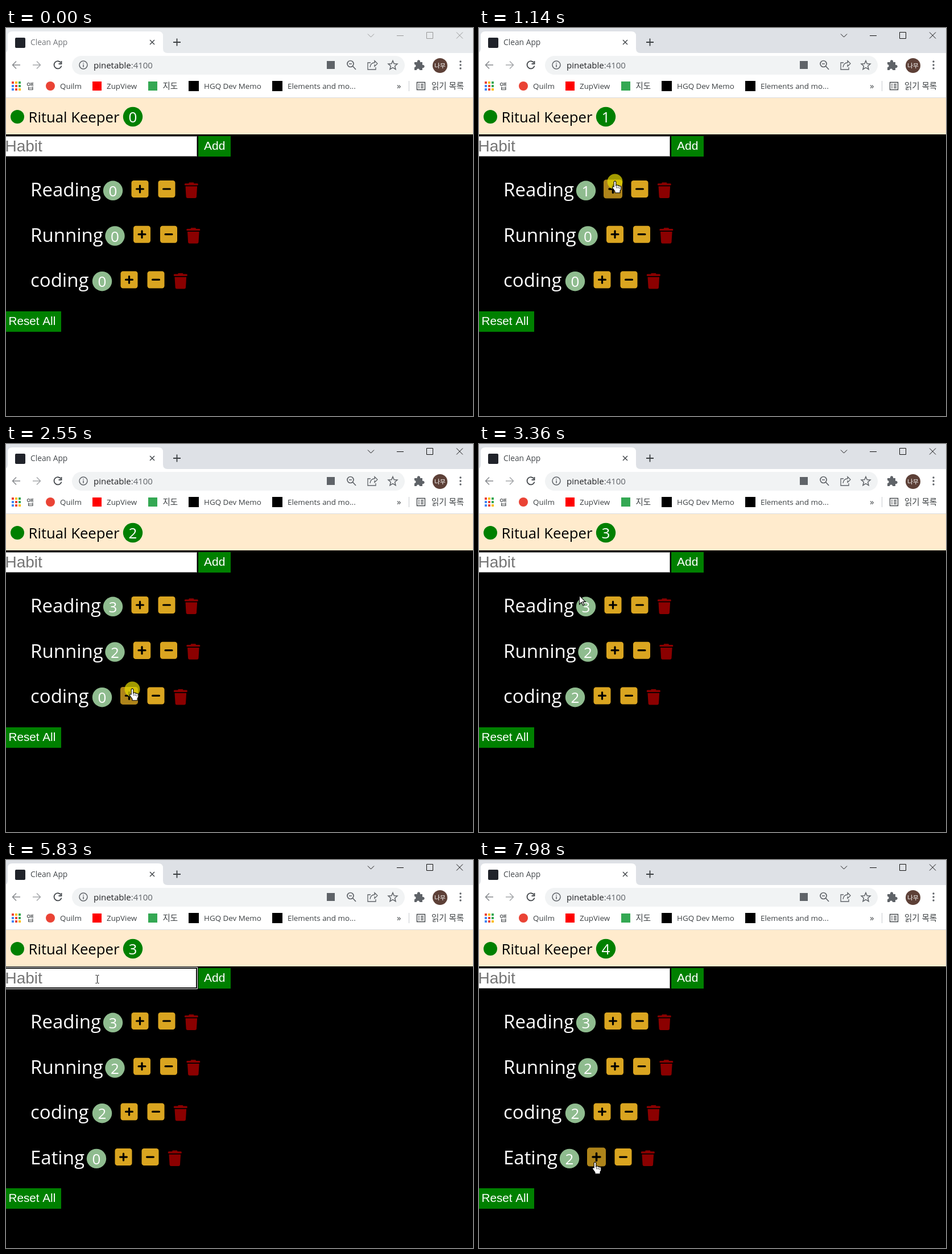
Recreate the animation shown at these times as an HTML page with a canvas. Size 821 px wide and 682 px high, loop 8000 ms.

```html
<!DOCTYPE html>
<html lang="ko">
<head>
<meta charset="utf-8">
<title>Clean App</title>
<style>
html, body { margin: 0; width: 100%; height: 100%; overflow: hidden; background: #000; }
canvas { display: block; width: 821px; height: 682px; }
</style>
</head>
<body>
<canvas id="stage" width="821" height="682"></canvas>
<script>
const ctx = document.getElementById('stage').getContext('2d');
const UI = '"Open Sans","Noto Sans CJK KR","Noto Sans CJK JP",sans-serif';
const ARIAL = '"Liberation Sans",Arial,sans-serif';
const LOOP = 8000, STEP = 200 / 3;
const GREY = '#5f6368';

// count: the times at which a habit's counter goes up; hover: time span of the pointer on its plus button
const habits = [
  { name: 'Reading', x: 188, count: [1080, 1330, 1530], hover: [850, 1650] },
  { name: 'Running', x: 191.5, count: [1960, 2230], hover: [1690, 2400] },
  { name: 'coding', x: 169, count: [2620, 2820], hover: [2470, 3060] },
  { name: 'Eating', x: 159, count: [7850, 7980], hover: [7040, 8001] }
];
const clicks = [[1010, 1270], [1330, 1400], [1490, 1560], [1890, 2030], [2160, 2290],
  [2550, 2620], [2690, 2820], [3560, 3690], [7790, 7850], [7910, 7980]];
const typing = [4500, 4700, 4960, 5170, 5300, 5430];
const ACTIVATE = 1010, SUBMIT = 5830, FOCUS = [3560, 7790];
const route = [
  [200, 497, 619], [540, 380, 372], [900, 239, 270], [1500, 239, 270], [1720, 241, 349],
  [2300, 241, 349], [2490, 222, 431], [3000, 222, 431], [3450, 160.5, 209], [6540, 160.5, 209],
  [6640, 190, 325], [6740, 214, 586], [6860, 200, 542], [6930, 200, 542], [7150, 204, 532]
];

const HAND = new Path2D('M-2 1a2 2 0 0 1 4 0v7l1-1a2 2 0 0 1 3 1 2 2 0 0 1 3 1 2 2 0 0 1 3 1v5l-2 3v4h-10v-3l-5-7a2 2 0 0 1 3-2z');
const ARROW = new Path2D('M0 0v17l4-4 3 6 2.5-1-3-6h5.5z');
const TAB = new Path2D('M-5 44q8 0 8-8V14q0-8 8-8H268q8 0 8 8V36q0 8 8 8z');
const PUZZLE = new Path2D('M718 60h5a2.7 2.7 0 1 1 5 0h4v5a2.7 2.7 0 1 1 0 5v4h-5a2.5 2.5 0 0 0-5 0h-4v-5a2.5 2.5 0 0 0 0-5z');

const within = (t, [from, to]) => t >= from && t < to;
const passed = (t, times) => times.filter(at => t >= at).length;
const clamp = v => Math.max(0, Math.min(1, v));

function rect(x, y, w, h, color, radius = 0) {
  ctx.fillStyle = color;
  ctx.beginPath();
  ctx.roundRect(x, y, w, h, radius);
  ctx.fill();
}
function disc(x, y, r, color) {
  ctx.fillStyle = color;
  ctx.beginPath();
  ctx.arc(x, y, r, 0, 7);
  ctx.fill();
}
function text(str, x, y, size, color, family = UI, align = 'left') {
  ctx.font = `${size}px ${family}`;
  ctx.textAlign = align;
  ctx.fillStyle = color;
  ctx.fillText(str, x, y);
}
function line(path, color, width = 1.5) {
  ctx.strokeStyle = color;
  ctx.lineWidth = width;
  ctx.stroke(new Path2D(path));
}
function badge(n, x, y, color) {
  disc(x, y, 17.2, color);
  text(n, x, y + 10, 26, '#fff', UI, 'center');
}

function drawTabStrip(active) {
  const control = active ? '#111' : '#999';
  rect(0, 0, 821, 44, active ? '#dee1e6' : '#e7eaed');
  ctx.fillStyle = '#fff';
  ctx.fill(TAB);
  rect(16, 17, 18, 18, '#20232a', 2);
  text('Clean App', 43, 30, 13.8, active ? '#45494d' : '#74777b');
  line('M253 21l8 8m0-8l-8 8', '#45494d');
  line('M294 25h13M300.5 18.5v13', '#3c4043', 1.8);
  line('M636 10.5l5.5 5.5 5.5-5.5M687 13.5h12M739.5 7.5h11v11h-11zM792 7.5l11 11m0-11l-11 11', control, 1);
}

function drawToolbar() {
  rect(0, 44, 821, 78, '#fff');
  rect(0, 122, 821, 1, '#dadce0');
  line('M25 65H12m6-6.5l-6.5 6.5 6.5 6.5', '#85888c');
  line('M47 65h13m-6-6.5l6.5 6.5-6.5 6.5', '#a5a8ab');
  line('M96.5 61a6.6 6.6 0 1 0 1 5.5M97.5 58v5h-5', '#45494d', 1.8);

  rect(116, 49, 585, 33, '#f1f3f4', 16.5);
  line('M143 65a7 7 0 1 1-14 0 7 7 0 1 1 14 0M136 64v5M136 61v1.6', GREY);
  text('pinetable', 154, 71, 15, '#202124');
  const width = ctx.measureText('pinetable').width;
  text(':4100', 154 + width, 71, 15, GREY);
  rect(564, 58, 14, 14, GREY);
  line('M611 63a5.5 5.5 0 1 1-11 0 5.5 5.5 0 1 1 11 0M609.5 67l5.5 6M603 63h5', GREY, 1.7);
  line('M641 61h-5v12h14v-4M640 69q1-8 8-8v-3.5l5 5-5 5v-3.5', GREY, 1.3);
  line('M680 57.5l2.2 5.2 5.8.5-4.4 3.8 1.4 5.6-5-3-5 3 1.4-5.6-4.4-3.8 5.8-.5z', GREY);
  ctx.fillStyle = GREY;
  ctx.fill(PUZZLE);
  disc(763, 66, 13, '#5d4037');
  text('나무', 763, 69.5, 10.5, '#fff', UI, 'center');
  for (const y of [59, 65, 71]) disc(799, y, 1.7, GREY);
}

function drawBookmarks() {
  const dots = ['#ea4335', '#fbbc05', '#34a853', '#4285f4'];
  for (let i = 0; i < 9; i++) {
    rect(10 + i % 3 * 6, 94 + Math.floor(i / 3) * 6, 4, 4, dots[(i + (i > 4)) % 4]);
  }
  const label = (str, x, size = 13.4) => text(str, x, 107, size, '#3c4043');
  label('앱', 36, 14.2);
  disc(78, 102, 8, '#ea4335');
  label('Quilm', 95);
  rect(152, 94, 16, 16, '#f00');
  label('ZupView', 177);
  rect(250, 94, 16, 16, '#34a853');
  label('지도', 275.5, 14.5);
  rect(321, 93, 18, 18, '#000');
  label('HGQ Dev Memo', 348);
  rect(468, 93, 18, 18, '#000');
  label('Elements and mo...', 495);
  label('»', 687, 15);
  rect(708, 93, 1, 18, '#c8cbd0');
  line('M722.5 95.5h14v13h-14zM725 99h2m2 0h5M725 102h2m2 0h5M725 105h2m2 0h5', '#45494d', 1.4);
  label('읽기 목록', 748, 14.5);
}

function drawHeader(total) {
  rect(0, 123, 821, 64, '#ffebcd');
  disc(20, 156, 12, 'green');
  text('Ritual Keeper', 39.5, 166, 25.7, '#000');
  badge(total, 223, 156, 'green');
}

function drawForm(t) {
  if (within(t, FOCUS)) {
    rect(-4, 188, 341, 39, '#fff', 1);
    rect(-3, 189, 339, 37, '#101010');
    rect(0, 191, 334, 33, '#fff');
  } else {
    rect(-2, 190, 338, 36, '#858585');
    rect(0, 191, 335, 34, '#fff');
  }
  const typed = t < SUBMIT ? 'Eating'.slice(0, passed(t, typing)) : '';
  text(typed || 'Habit', -1.5, 217, 28, typed ? '#000' : '#757575', ARIAL);
  if (typed) rect(Math.floor(ctx.measureText(typed).width - 1.5), 192, 1, 31, '#000');
  rect(338, 190, 57, 36, 'green');
  text('Add', 348, 214, 21, '#fff', ARIAL);
}

function drawPlusMinus(x, y, isPlus, grow, hovered) {
  ctx.save();
  ctx.translate(x, y);
  ctx.scale(1 + grow * 0.1, 1 + grow * 0.1);
  rect(-15, -15, 30, 30, hovered ? '#ae841a' : '#daa520', 4.2);
  rect(-7.5, -1.6, 15, 3.2, '#000', 1.6);
  if (isPlus) rect(-1.6, -7.5, 3.2, 15, '#000', 1.6);
  ctx.restore();
}

function drawTrash(x, y) {
  const red = '#8b0000';
  rect(x - 4.5, y - 11.5, 9, 3, red, 1);
  rect(x - 12, y - 9.8, 24, 3.4, red, 1.5);
  ctx.fillStyle = red;
  ctx.fill(new Path2D(`M${x - 10.3} ${y - 4.7}h20.6l-1.1 18.2q-.2 2.5-2.6 2.5h-13.2q-2.4 0-2.6-2.5z`));
}

function drawHabit(habit, index, t) {
  const y = 283 + index * 79.7, x = habit.x;
  const [from, to] = habit.hover;
  const grow = clamp((t - from) / 250) * (1 - clamp((t - to) / 180));
  text(habit.name, 43, y + 13, 33, '#fff');
  badge(passed(t, habit.count), x, y + 2.8, '#8fbc8f');
  drawPlusMinus(x + 47.5, y, true, grow, within(t, habit.hover));
  drawPlusMinus(x + 94.5, y, false, 0, false);
  drawTrash(x + 137.8, y);
}

function pointerAt(t) {
  const time = Math.max(route[0][0], Math.floor(t / STEP) * STEP);
  const next = route.findIndex(key => key[0] > time);
  if (next < 0) return route[route.length - 1].slice(1);
  const [t0, x0, y0] = route[next - 1], [t1, x1, y1] = route[next];
  const k = (time - t0) / (t1 - t0);
  return [x0 + (x1 - x0) * k, y0 + (y1 - y0) * k];
}

function drawPointer(t) {
  if (t < route[0][0]) return;
  const [x, y] = pointerAt(t);
  if (clicks.some(span => within(t, span))) disc(x, y, 13.5, 'rgba(230,220,0,.7)');
  ctx.save();
  ctx.translate(x, y);
  if (t > 3400 && y < 226) {
    line('M-3-6.5h2l1 1 1-1h2M0-6V6.5M-3 7.5h2l1-1 1 1h2', '#000', 1);
  } else {
    const shape = habits.some(h => within(t, h.hover)) ? HAND : ARROW;
    ctx.scale(0.9, 0.9);
    ctx.fillStyle = '#fff';
    ctx.strokeStyle = '#000';
    ctx.lineWidth = 1.2;
    ctx.fill(shape);
    ctx.stroke(shape);
    if (shape === HAND) line('M3 9v4M6 10v3M9 11v3', '#000', 0.9);
  }
  ctx.restore();
}

function draw(t) {
  rect(0, 0, 821, 682, '#000');
  drawTabStrip(t >= ACTIVATE);
  drawToolbar();
  drawBookmarks();
  drawHeader(habits.filter(h => t >= h.count[0]).length);
  drawForm(t);
  const rows = t < SUBMIT ? 3 : 4;
  habits.slice(0, rows).forEach((habit, i) => drawHabit(habit, i, t));
  const resetY = 498 + (rows - 3) * 79;
  rect(0, resetY, 97, 36, 'green');
  text('Reset All', 4.5, resetY + 24, 20.7, '#fff', ARIAL);
  drawPointer(t);
}

const start = performance.now();
function tick() {
  draw((performance.now() - start) % LOOP);
  requestAnimationFrame(tick);
}
tick();
</script>
</body>
</html>
```
